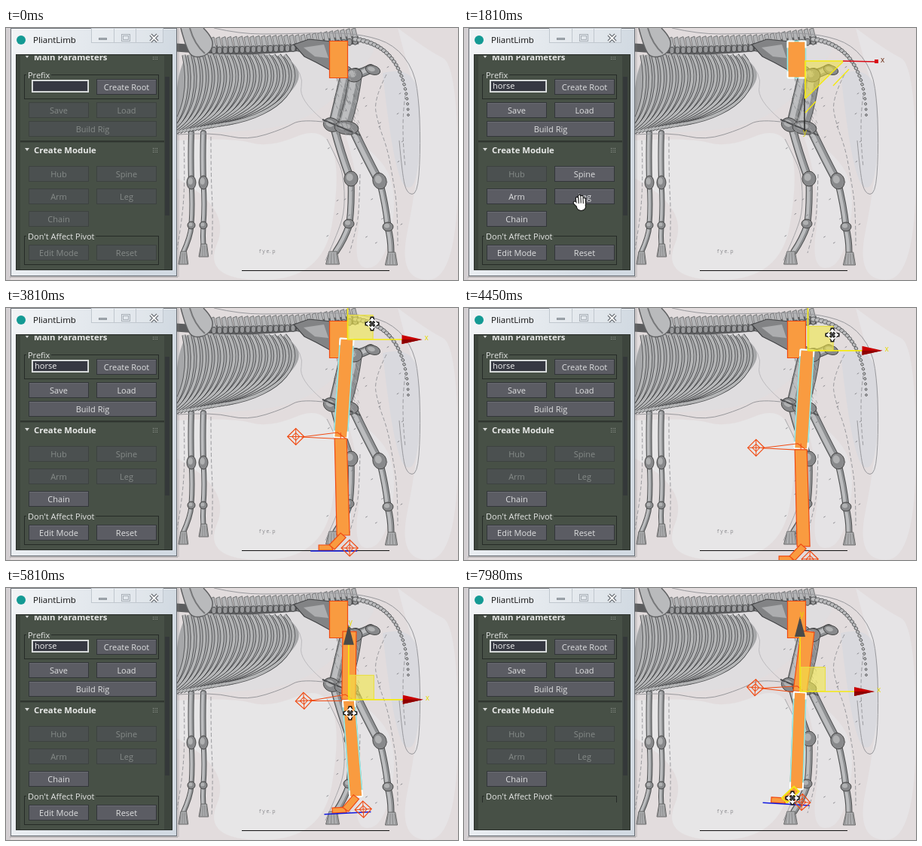
Animation, 600 px wide and 336 px high, one loop 8000 ms. Source, as an HTML page with a canvas:

```html
<!DOCTYPE html>
<html lang="en">
<head>
<meta charset="utf-8">
<title>Leg rig setup</title>
<style>
html, body { margin: 0; width: 100%; height: 100%; overflow: hidden; background: #e3dfdf; }
canvas { display: block; }
</style>
</head>
<body>
<canvas id="stage" width="600" height="336"></canvas>
<script>
const LOOP = 8000, W = 600, H = 336;
const FONT = '"Open Sans", "Noto Sans", sans-serif';
const ORANGE = '#f99b40', RED = '#f04a12', YELLOW = '#f4ea10', CYAN = '#8ff0f0';
let c = document.getElementById('stage').getContext('2d');

let seed = 11;
const rnd = () => (seed = seed * 16807 % 2147483647) / 2147483647;

// ---------- drawing helpers ----------
function rect(x, y, w, h, fill, stroke) {
  if (fill) { c.fillStyle = fill; c.fillRect(x, y, w, h); }
  if (stroke) { c.strokeStyle = stroke; c.lineWidth = 1; c.strokeRect(x + .5, y + .5, w - 1, h - 1); }
}

function finish(fill, stroke, width = 1) {
  if (fill) { c.fillStyle = fill; c.fill(); }
  if (stroke) { c.strokeStyle = stroke; c.lineWidth = width; c.stroke(); }
}

function poly(p, fill, stroke, width, open) {
  c.beginPath();
  for (let i = 0; i < p.length; i += 2) c.lineTo(p[i], p[i + 1]);
  if (!open) c.closePath();
  finish(fill, stroke, width);
}

const line = (x1, y1, x2, y2, color, width) => poly([x1, y1, x2, y2], null, color, width, true);

function curve(p, stroke, width, fill) {
  const n = p.length;
  c.beginPath();
  c.moveTo(p[0], p[1]);
  for (let i = 2; i < n - 2; i += 2) {
    const last = i === n - 4;
    c.quadraticCurveTo(p[i], p[i + 1],
      last ? p[i + 2] : (p[i] + p[i + 2]) / 2, last ? p[i + 3] : (p[i + 1] + p[i + 3]) / 2);
  }
  finish(fill, stroke, width);
}

function blob(x, y, rx, ry, fill, stroke, angle = 0) {
  c.beginPath();
  c.ellipse(x, y, rx, ry, angle, 0, 7);
  finish(fill, stroke);
}

function text(s, x, y, color, size = 11, weight = 400, align = 'left') {
  c.font = `${weight} ${size}px ${FONT}`;
  c.textAlign = align;
  c.fillStyle = color;
  c.fillText(s, x, y);
}

// ---------- engraving behind the rig ----------
function bone(p, w) {
  c.lineCap = 'round';
  curve(p, '#4e4f50', w);
  curve(p, '#8e9092', w - 2);
  c.save();
  c.translate(-w * .12, 0);
  curve(p, '#bcbdbf', w * .45);
  c.restore();
  c.lineCap = 'butt';
}

function joint(x, y, rx, ry, angle) {
  blob(x, y, rx, ry, '#88898b', '#444', angle);
  blob(x - rx * .2, y - ry * .2, rx * .5, ry * .5, '#b0b1b2', null, angle);
}

function hoof(x, y, s) {
  poly([x - 8 * s, y + 13, x - 4 * s, y - 4, x + 6 * s, y - 4, x + 9 * s, y + 13], '#aeafb1', '#666');
  for (let i = -4; i < 6; i += 3) line(x + i * s, y - 2, x + i * 1.4 * s, y + 12, '#777', .7);
}

function paper() {
  rect(0, 0, W, H, '#e2dcdd');
  curve([226, 150, 300, 146, 350, 160, 420, 130, 445, 190, 420, 336, 260, 336, 300, 240, 226, 200], null, 0, '#e7e6e7');
  curve([520, 0, 560, 30, 600, 50, 600, 336, 520, 336, 545, 210, 552, 110, 530, 40, 520, 0], null, 0, '#e6e4e6');
  curve([500, 60, 538, 50, 552, 110, 545, 222, 515, 200, 500, 60], null, 0, '#d9d9de');
  curve([226, 60, 300, 20, 420, 5, 500, 12, 470, 60, 410, 118, 330, 140, 226, 140], null, 0, '#dfdddf');
  curve([450, 140, 500, 170, 520, 230, 500, 320, 460, 320, 475, 220, 450, 140], null, 0, '#e5e3e5');
}

function ribs() {
  curve([240, 36, 360, 30, 392, 55, 384, 82, 345, 112, 290, 130, 226, 140, 226, 60, 240, 36], null, 0, '#a6a7a9');
  for (let i = 0; i < 19; i++) {
    const t = i / 18, s = 236 + t * 134, e = 212 + t * 84, b = 142 - t * 15;
    for (const [color, width] of [['#525355', 5.2], ['#c9cacb', 3.2], ['#8d8e90', .7]]) {
      c.beginPath();
      c.moveTo(s, 36);
      c.bezierCurveTo(s + 8 + 24 * t, 72, e + 28 + 40 * t, b - 26 + 14 * t, e, b);
      finish(null, color, width);
    }
  }
}

function spine() {
  curve([226, 26, 300, 31, 360, 28, 405, 24, 430, 18, 468, 16], '#5b5c5e', 11);
  for (let x = 276; x < 466; x += 7.5) {
    const y = x < 400 ? 29 - (x - 276) * .03 : 25 - (x - 400) * .13;
    poly([x - 2, y, x - 5, y - 15, x, y - 17, x + 4, y], '#b4b5b7', '#606163', .8);
    blob(x, y + 1, 3.2, 4.5, '#98999b', '#48494b');
  }
  curve([232, 0, 240, 30, 250, 40, 268, 36, 276, 22, 270, 8, 262, 0], '#606163', 1.5, '#b9babc');
  curve([244, 0, 250, 22, 264, 34], '#77787a', 2);
  for (let i = 0; i < 25; i++) {
    const t = i / 24, u = 1 - t;
    const x = u * u * 464 + 2 * u * t * 531 + t * t * 534;
    const y = u * u * 15 + 2 * u * t * 24 + t * t * 116;
    blob(x, y, 4 - 2.6 * t, 3 - 1.6 * t, '#bbbcbe', '#5c5d5f', t * 1.4);
  }
}

function hindLegs() {
  bone([484, 54, 474, 60, 462, 62], 12);
  poly([382, 22, 402, 15, 432, 18, 436, 40, 450, 58, 430, 56, 412, 46, 396, 38], '#828385', '#444547', 1.2);
  poly([395, 26, 422, 22, 428, 40, 410, 38], '#acadaf');
  bone([452, 58, 444, 92, 436, 126], 15);
  bone([464, 62, 460, 95, 450, 126], 18);
  joint(462, 63, 11, 9);
  joint(487, 56, 10, 6, .3);
  bone([436, 134, 444, 165, 456, 198], 11);
  bone([462, 138, 478, 172, 494, 202], 12);
  joint(432, 129, 11, 9, .4);
  joint(452, 133, 16, 9, .1);
  line(420, 122, 470, 143, '#4d4e50', 2);
  bone([458, 202, 459, 235, 456, 260], 9);
  bone([456, 262, 449, 282, 438, 298], 9);
  joint(458, 201, 9, 10);
  joint(455, 261, 7, 6);
  hoof(433, 302, 1.05);
  bone([496, 204, 504, 236, 507, 264], 9);
  bone([507, 266, 511, 282, 511, 298], 9);
  joint(496, 204, 9, 11, -.3);
  joint(507, 265, 7, 6);
  hoof(511, 303, .95);
}

function foreLegs() {
  for (const [x, foot, hy] of [[246, 235, 302], [262, 262, 292]]) {
    bone([x, 140, x - 1, 170, x, 205], 8);
    bone([x, 207, x + 2, 235, x, 262], 7);
    bone([x, 264, x - 1, 278, foot, hy - 2], 7);
    joint(x, 206, 6, 9);
    joint(x, 263, 5, 5);
    hoof(foot, hy, .75);
  }
}

function outlines() {
  const ink = '#98989c';
  curve([276, 0, 310, 8, 370, 8, 430, 6, 475, 9, 515, 22, 542, 56, 549, 105, 550, 170, 546, 222, 532, 221, 526, 195, 522, 150], ink, 1);
  curve([228, 142, 275, 139, 320, 150, 370, 134, 392, 121, 428, 126], ink, 1);
  curve([376, 42, 396, 62, 388, 95, 420, 122], '#b3b2b5', .8);
  curve([426, 148, 438, 172, 448, 195, 450, 240, 442, 270, 424, 310], ink, .8);
  c.setLineDash([5, 3]);
  curve([505, 62, 488, 95, 494, 128, 506, 160, 512, 192, 520, 240, 520, 290], ink, 1);
  curve([470, 195, 469, 235, 466, 265, 456, 300], ink, 1);
  curve([272, 145, 272, 200, 275, 250, 273, 304], ink, 1);
  curve([530, 90, 524, 130, 530, 185], ink, 1);
  curve([236, 150, 238, 205, 232, 270, 224, 310], ink, 1);
  c.setLineDash([]);
}

function hatching() {
  for (let i = 0; i < 150; i++) {
    const x = 435 + rnd() * 32, y = 55 + rnd() * 85;
    line(x, y, x + 2, y + 4, rnd() < .5 ? '#55565888' : '#c8c9ca88', .7);
  }
  for (let i = 0; i < 34; i++) {
    const x = 418 + rnd() * 112, y = 30 + rnd() * 265;
    line(x, y, x + 2.5, y - 1.5, '#77777b', .8);
  }
  text('f y e. p', 336, 300, '#88888c', 7);
}

function makeBackdrop() {
  const layer = document.createElement('canvas'), screen = c;
  layer.width = W; layer.height = H;
  c = layer.getContext('2d');
  paper(); foreLegs(); ribs(); spine(); hindLegs(); outlines(); hatching();
  c = screen;
  return layer;
}

// ---------- tool window ----------
function frame(active) {
  rect(0, 0, 6, H, active ? '#b9b5b8' : '#d3cfd2');
  rect(227, 0, 3, 332, '#77777733');
  rect(5, 331, 223, 2, '#77777755');
  const g = c.createLinearGradient(0, 0, 220, 36);
  const tones = active ? ['#dce6ef', '#a8b8c6', '#8796a4'] : ['#f3f5f7', '#e3e8ed', '#d2dae2'];
  tones.forEach((tone, i) => g.addColorStop(i / 2, tone));
  rect(6, 0, 221, 331, g, active ? '#2f353b' : '#696f76');
  rect(7, 1, 219, 1, '#ffffffaa');
  blob(20, 16, 6, 6, '#149a94');
  text('PliantLimb', 36, 20, '#111', 11.5);
  if (active) {
    rect(113, 0, 60, 20, '#aab8c4', '#4d5863');
    rect(143, 0, 1, 20, '#4d5863');
    const r = c.createLinearGradient(0, 0, 0, 20);
    r.addColorStop(0, '#dd9a8a'); r.addColorStop(.5, '#bf3f2a'); r.addColorStop(1, '#d6694d');
    rect(172, 0, 37, 20, r, '#4a2420');
  } else {
    rect(113, 0, 96, 20, '#ffffff33', '#c0c7ce');
    rect(143, 0, 1, 20, '#c0c7ce');
    rect(172, 0, 1, 20, '#c0c7ce');
  }
  const mark = active ? '#f7f9fb' : '#a9b0b7';
  rect(123, 13, 11, 3, mark, active ? '#59636d' : '#8d949b');
  rect(153, 8, 12, 10, null, mark);
  rect(155, 10, 8, 6, null, mark);
  for (const [color, w] of [[active ? '#5b3434' : '#555b62', 4], ['#fff', 2]]) {
    line(192, 9, 201, 18, color, w);
    line(201, 9, 192, 18, color, w);
  }
}

function button(label, x, y, w, on, pressed) {
  rect(x, y, w, 21, pressed ? '#423f38' : on ? '#5b5c63' : '#4b5050', on ? '#33363a' : '#3d4240');
  if (on) rect(x + 1, y + 1, w - 2, 1, '#6b6c73');
  text(label, x + w / 2, y + 15, on ? '#dedfe0' : '#858a88', 11, 400, 'center');
}

function rollout(label, y) {
  text(label, 37, y, '#e8e9e8', 11.35, 700);
  poly([25, y - 7, 31, y - 7, 28, y - 3], '#d6d8d6');
  for (let i = 0; i < 9; i++) rect(195 + i % 3 * 2.5, y - 7 + (i / 3 | 0) * 2.5, 1, 1, '#9ca19c');
}

function group(label, y, h, labelWidth) {
  rect(24, y, 179, h, null, '#262b27');
  rect(27, y, labelWidth + 4, 1, '#475046');
  text(label, 29, y + 5, '#e4e5e4');
}

function panel(t, active) {
  const on = t >= 1000, chosen = t >= 2370;
  frame(active);
  rect(13, 35, 208, 288, '#3d453d', '#2b302c');
  rect(19, 37, 191, 113, '#475046');
  rect(19, 153, 191, 169, '#475046');
  rect(19, 150, 191, 2, '#303630');
  rect(211, 65, 6, 185, '#343839');
  c.save();
  c.beginPath(); c.rect(14, 37, 206, 285); c.clip();
  rollout('Main Parameters', 43);
  c.restore();
  group('Prefix', 62, 33, 29);
  rect(34, 69, 76, 17, '#363842', '#e6e8e8');
  rect(35, 70, 74, 15, null, '#c8cccc');
  if (on) text('horse', 38, 81, '#f2f2f2');
  button('Create Root', 120, 68, 80, true);
  button('Save', 30, 99, 80, on);
  button('Load', 120, 99, 80, on);
  button('Build Rig', 30, 124, 170, on);
  rollout('Create Module', 167);
  button('Hub', 30, 184, 80, false);
  button('Spine', 120, 184, 80, on && !chosen);
  button('Arm', 30, 214, 80, on && !chosen);
  button('Leg', 120, 214, 80, on && !chosen, t >= 2170 && t < 2600);
  button('Chain', 30, 244, 80, on);
  group("Don't Affect Pivot", 277, 39, 88);
  if (t < 7940) {
    button('Edit Mode', 30, 289, 80, on);
    button('Reset', 120, 289, 80, on);
  } else rect(19, 286, 191, 36, '#475046');
}

// ---------- motion ----------
function track(t, keys) {
  let a = keys[0];
  for (const b of keys) {
    if (t < b[0]) {
      if (b === a) break;
      const u = (t - a[0]) / (b[0] - a[0]), s = u * u * (3 - 2 * u);
      return [a[1] + (b[1] - a[1]) * s, a[2] + (b[2] - a[2]) * s];
    }
    a = b;
  }
  return [a[1], a[2]];
}

const HIP = [[3810, 452.5, 42], [4490, 455.5, 57], [4610, 456, 59.5], [4810, 456, 59.5], [4850, 456, 59]];
const KNEE = [[5400, 447.5, 189], [5850, 455, 148], [6130, 458, 127], [6370, 456, 130],
  [6530, 441, 127], [6650, 442, 131], [6850, 444, 135], [6890, 446, 138]];
const POINTER = [[280, 521, 300], [840, 437, 38], [1530, 437, 38], [1810, 154, 233], [1970, 158, 230],
  [2169, 158, 230], [2170, 167, 221], [2450, 167, 221], [3170, 430, 62], [3530, 480, 26], [3690, 486, 21],
  [3810, 486, 21], [4490, 489, 36], [4610, 490, 38], [5050, 490, 38], [5210, 457, 186], [5370, 450, 207]];

function pose(t) {
  const hip = track(t, HIP);
  const knee = t < 5400 ? [hip[0] - 8.3, hip[1] + 131] : track(t, KNEE);
  return { hip, knee, tilt: Math.atan2(knee[0] - hip[0], knee[1] - hip[1]) };
}

// ---------- rig ----------
function glow(p) {
  poly(p, null, CYAN, 1.6);
  for (let i = 0; i < p.length; i += 2)
    for (const j of [(i + 2) % p.length, (i + p.length - 2) % p.length]) {
      const dx = p[j] - p[i], dy = p[j + 1] - p[i + 1], k = Math.min(.5, 9 / Math.hypot(dx, dy));
      line(p[i], p[i + 1], p[i] + dx * k, p[i + 1] + dy * k, '#fff', 2);
    }
}

function part(p, selected) {
  poly(p, ORANGE, RED, 1.2);
  if (selected) glow(p);
}

function handle(x, y) {
  poly([x - 11, y, x, y - 11, x + 11, y, x, y + 11], null, RED, 1.2);
  poly([x - 5, y, x, y - 5, x + 5, y, x, y + 5], null, RED, 1);
  line(x - 11, y, x + 11, y, RED);
  line(x, y - 11, x, y + 11, RED);
}

function leg({ hip, knee, tilt }, t) {
  const lower = t >= 5250;
  const length = Math.hypot(knee[0] - hip[0], knee[1] - hip[1]);
  c.save();
  c.translate(...hip);
  c.rotate(-tilt);
  part([-9, -1, 9, -1, 9, length, -9, length], !lower);
  c.restore();

  c.save();
  c.translate(...knee);
  c.rotate(-tilt - .063);
  poly([-52, -1, -4, -7, 8, 2], null, RED, 1);
  line(0, -7, 0, 2, RED);
  handle(-59.5, -1.5);
  part([-8, 1, 8, 1, 12, 130, -5, 130], lower && t < 7940);
  if (lower && t >= 7940) glow([-8, 1, 8, 1, 12, 130, -5, 130]);
  poly([-29, 143, -13, 143, -10, 150, -29, 150], ORANGE, RED, 1.2);
  const heel = [-15, 143, 0, 127, 7, 133, -8, 149];
  poly(heel, ORANGE, RED, 1.2);
  if (t >= 7940) poly(heel, null, YELLOW, 2);
  line(-40, 151, 22, 151, '#1018e0', 1.5);
  handle(12, 147);
  c.restore();
}

// ---------- gizmos ----------
function moveGizmo(x, y) {
  rect(x + 1, y - 33, 33, 33, '#f4ea4a99');
  rect(x + 1, y - 33, 33, 33, null, '#e8de40');
  line(x, y, x + 73, y, YELLOW, 1.6);
  line(x, y, x, y - 74, YELLOW, 1.6);
  poly([x + 72, y - 6, x + 99, y, x + 72, y + 6], '#c80000');
  poly([x + 72, y, x + 99, y, x + 72, y + 6], '#8e0000');
  poly([x - 7, y - 73, x, y - 100, x + 7, y - 73], '#4a4a48');
  text('x', x + 102, y + 1, '#e5d800', 10);
  text('y', x, y - 100, '#e5d800', 10);
}

function scaleGizmoHub() {
  poly([452, 43, 503, 44, 452, 94], '#f0e23a88');
  line(503, 45, 452, 95, YELLOW, 1.6);
  line(453, 44, 503, 44, YELLOW, 1.6);
  line(453, 44, 453, 94, YELLOW, 1.6);
  line(503, 44, 548, 45, '#d80a14', 1.5);
  line(452, 94, 452, 138, '#222', 1.4);
  rect(545, 42, 5, 5, '#d80a14');
  line(490, 77, 511, 55, YELLOW, 1.4);
  line(453, 113, 467, 98, YELLOW, 1.4);
  text('x', 553, 46, '#6a2a10', 10);
  text('y', 450, 142, '#d8cc00', 10);
}

function scaleGizmoLeg() {
  poly([453, 42, 403, 40, 448, 94], '#f4d90099');
  line(453, 42, 403, 40, YELLOW, 1.5);
  line(453, 42, 448, 94, YELLOW, 1.5);
  c.setLineDash([6, 5]);
  line(403, 40, 448, 94, YELLOW, 1.5);
  line(378, 40, 440, 106, YELLOW, 1.5);
  c.setLineDash([]);
  line(449, 94, 446, 138, '#7a1010', 1.4);
  text('y', 353, 36, '#d8cc00', 10);
  text('x', 447, 143, '#8a7a00', 10);
}

// ---------- pointers ----------
function arrow(x, y) {
  poly([x, y, x, y + 17, x + 4, y + 13, x + 7, y + 19, x + 9.5, y + 18, x + 7, y + 12, x + 12, y + 12], '#fff', '#111', 1.1);
}

function hand(x, y) {
  c.lineCap = 'round';
  for (const [color, extra] of [['#111', 2.2], ['#fff', 0]]) {
    for (let i = 0; i < 4; i++)
      line(x - 3 + i * 3, y + 2, x - 4 + i * 3.2, y - [6, 9, 8, 5][i], color, 2.2 + extra);
    line(x - 2, y + 5, x - 7, y, color, 2.6 + extra);
    blob(x + 1.5, y + 5, 5.5 + extra / 2, 5 + extra / 2, color);
  }
  for (let i = 0; i < 3; i++) line(x - 2 + i * 3, y + 1, x - 2 + i * 3, y - 6, '#555', .7);
  c.lineCap = 'butt';
}

function moveCursor(x, y) {
  for (const [color, r, w] of [['#111', 9.5, 5], ['#fff', 8, 2.2]]) {
    line(x - r, y, x + r, y, color, w);
    line(x, y - r, x, y + r, color, w);
    for (let i = 0; i < 4; i++) {
      c.save();
      c.translate(x, y);
      c.rotate(i * Math.PI / 2);
      poly([r, 0, r - 4, -4, r - 4, 4], color);
      c.restore();
    }
  }
  line(x - 3, y, x + 3, y, '#111', 1.4);
  line(x, y - 3, x, y + 3, '#111', 1.4);
}

function pointer(t, knee) {
  if (t < 280) return;
  if (t >= 5400) {
    const rest = [knee[0] + 2, knee[1] + 18];
    if (t < 7220) return moveCursor(...rest);
    const p = track(t, [[7220, ...rest], [7500, 437, 215], [7780, 436, 280]]);
    return t >= 7780 ? moveCursor(...p) : arrow(...p);
  }
  const [x, y] = track(t, POINTER);
  if (t > 1530 && t < 2170 && x < 226) hand(x, y);
  else if ((t >= 3690 && t < 5050) || t >= 5290) moveCursor(x, y);
  else arrow(x, y);
}

// ---------- scene ----------
const backdrop = makeBackdrop();

function draw(t) {
  const p = pose(t);
  c.drawImage(backdrop, 0, 0);
  line(313, 323.5, 509, 323.5, '#111', 1);
  const hub = [429.5, 17.5, 453.5, 17.5, 453.5, 66.5, 429.5, 66.5];
  part(hub, t >= 1000 && t < 2370);
  if (t >= 2370) leg(p, t);
  if (t >= 1000 && t < 2370) scaleGizmoHub();
  else if (t >= 2370 && t < 3250) scaleGizmoLeg();
  else if (t >= 3250) moveGizmo(...(t < 5250 ? [p.hip[0] + 1, p.hip[1]] : p.knee));
  panel(t, t >= 2170 && t < 3250);
  pointer(t, p.knee);
}

const start = performance.now();
function tick() {
  draw((performance.now() - start) % LOOP);
  requestAnimationFrame(tick);
}
tick();
</script>
</body>
</html>
```
